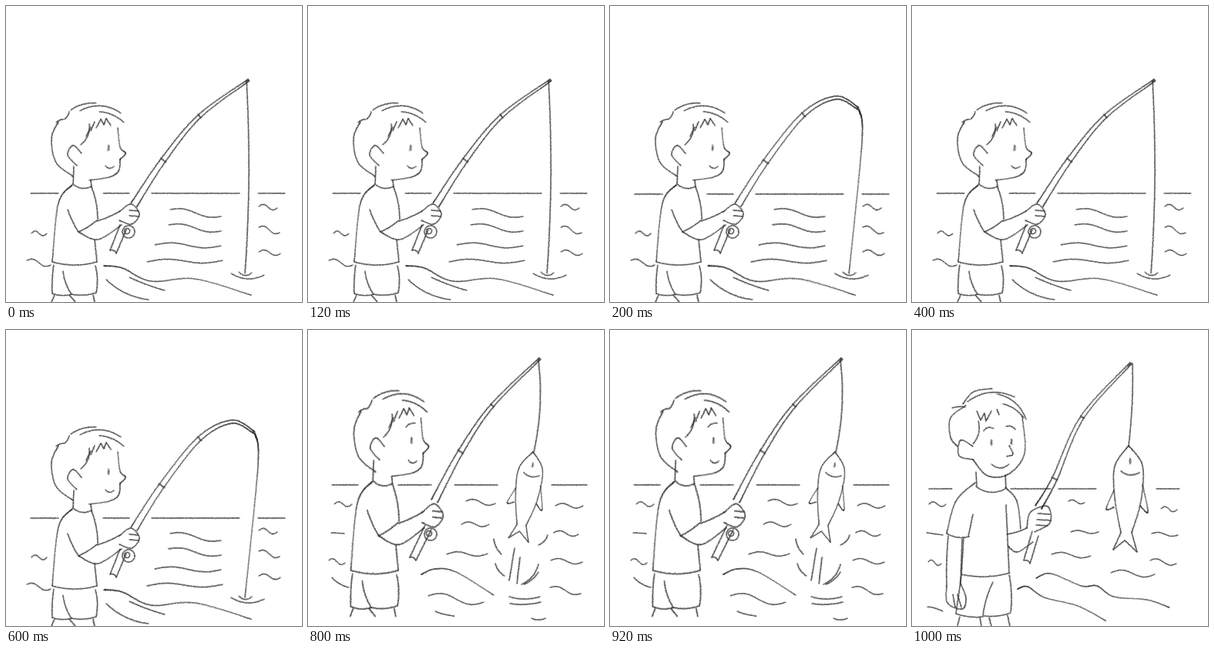
Write an HTML page with a canvas that moves like this. It is 384x384 px and loops after 1200 ms.

```html
<!DOCTYPE html>
<html lang="en">
<head>
<meta charset="utf-8">
<title>Fishing</title>
<style>
html, body { margin: 0; width: 100%; height: 100%; overflow: hidden; background: #fff; }
canvas { display: block; width: 100vw; height: 100vh; }
</style>
</head>
<body>
<canvas id="stage" width="384" height="384"></canvas>
<script>
const SIZE = 384, STEP = 200;
let g, seed, pen = 2.2;

function rnd() {
  seed = (seed * 1664525 + 1013904223) >>> 0;
  return seed / 2 ** 32;
}

// Pencil along a curve: a faint core with grain scattered across its width
function trace(at, length) {
  const n = Math.ceil(length * 2) + 2;
  g.strokeStyle = 'rgba(70,70,70,.34)';
  g.lineWidth = pen * 0.8;
  g.beginPath();
  for (let i = 0; i <= n; i++) g.lineTo(...at(i / n));
  g.stroke();
  for (let i = 0; i <= n * 3; i++) {
    const [x, y] = at(i / n / 3), r = (rnd() + rnd() - 1) * pen * 0.72, a = rnd() * 6.3;
    g.fillStyle = `rgba(55,55,55,${0.1 + rnd() * 0.34})`;
    g.fillRect(x + Math.cos(a) * r - 0.45, y + Math.sin(a) * r - 0.45, 0.9, 0.9);
  }
}

// Arc between two points; b is how far its middle bows sideways
function arc(x1, y1, x2, y2, b = 0) {
  const dx = x2 - x1, dy = y2 - y1, d = Math.hypot(dx, dy);
  trace(t => {
    const k = 4 * b * t * (1 - t) / d;
    return [x1 + dx * t - dy * k, y1 + dy * t + dx * k];
  }, d);
}

const pairs = v => v.flatMap((x, i) => i % 2 ? [] : [[x, v[i + 1]]]);

// Smooth curve through all points
function spline(p) {
  const last = p.length - 1;
  return t => {
    const i = Math.min(last - 1, Math.floor(t * last)), u = t * last - i;
    const b = p[i], c = p[i + 1], a = p[i - 1] || b, d = p[i + 2] || c;
    return [0, 1].map(j => b[j] + u / 2 * (c[j] - a[j] +
      u * (2 * a[j] - 5 * b[j] + 4 * c[j] - d[j] + u * (3 * (b[j] - c[j]) + d[j] - a[j]))));
  };
}

function span(p) {
  return p.slice(1).reduce((s, q, i) => s + Math.hypot(q[0] - p[i][0], q[1] - p[i][1]), 0);
}

function curve(...v) {
  const p = pairs(v);
  trace(spline(p), span(p));
}

function zigzag(...v) {
  const p = pairs(v);
  p.slice(1).forEach((q, i) => arc(...p[i], ...q));
}

function ring(x, y, r) {
  trace(t => [x + r * Math.cos(t * 6.3), y + r * Math.sin(t * 6.3)], r * 6);
}

function wave(x, y, w, drop = 0, amp = 3, turns = 1) {
  trace(t => [x + w * t, y + drop * t - amp * Math.sin(t * turns * 6.28)], w);
}

function bold(w, fn) {
  const old = pen;
  pen = w;
  fn();
  pen = old;
}

const eye = (x, y) => bold(3.6, () => arc(x, y - 3, x, y + 3));
const horizon = (y, ...ends) => pairs(ends).forEach(([a, b]) => arc(a, y, b, y));

// Tapered rod, with joints at its second and third points
function rod(...v) {
  const p = pairs(v), at = spline(p), n = p.length - 1, len = span(p);
  const edge = (t, side) => {
    const [x, y] = at(t), [a, b] = at(Math.max(0, t - 0.01)), [c, d] = at(Math.min(1, t + 0.01));
    const k = side * (4.5 - 3.3 * t) / Math.hypot(c - a, d - b);
    return [x - (d - b) * k, y + (c - a) * k];
  };
  for (const side of [-1, 1]) trace(t => edge(t, side), len);
  bold(3, () => {
    for (const k of [1, 2]) arc(...edge(k / n, -1.2), ...edge(k / n, 1.2));
    arc(...at(0.97), ...at(1));
  });
}

function handle(x1, y1, x2, y2) {
  arc(x1 - 4, y1 - 3, x2 - 4, y2 - 2);
  arc(x1 + 4, y1 + 3, x2 + 4, y2 + 2);
  arc(x2 - 4, y2 - 2, x2 + 4, y2 + 2, -2);
}

function reel(x, y) {
  ring(x, y, 8);
  ring(x - 2, y - 1, 3.5);
}

function placed(x, y, sx, sy, turn, fn) {
  g.save();
  g.translate(x, y);
  g.rotate(turn);
  g.scale(sx, sy);
  fn();
  g.restore();
}

function sideHead() {
  arc(65, 151, 75, 147, -1);
  arc(76, 147, 82, 137, 1);
  arc(84, 135, 117, 126, -3);
  arc(96, 136, 149, 139, -8);
  arc(121, 137, 153, 151, -3);
  arc(97, 180, 108, 153, 4);
  arc(104, 169, 110, 157);
  zigzag(110, 162, 115, 150);
  zigzag(117, 158, 123, 147, 127, 154, 130, 146, 136, 155);
  curve(68, 150, 59, 172, 65, 203, 87, 221);
  curve(98, 191, 87, 181, 80, 193, 92, 207);
  curve(145, 158, 148, 183, 155, 191, 148, 199);
  curve(148, 199, 146, 214, 134, 222, 108, 226);
  arc(129, 207, 140, 208, 3);
  eye(133, 184);
}

function sideBody() {
  arc(88, 208, 87, 231);
  arc(110, 226, 111, 235);
  arc(87, 231, 111, 234, 4);
  curve(86, 232, 68, 256, 60, 332);
  arc(111, 235, 119, 277, -2);
  arc(60, 332, 118, 332, 4);
  arc(115, 303, 118, 332);
  arc(80, 264, 94, 293, 1);
  arc(94, 293, 118, 278, 1);
  arc(118, 279, 148, 266, 1);
  curve(94, 293, 119, 303, 150, 284);
  curve(147, 267, 162, 257, 173, 270, 163, 283, 147, 278);
  arc(160, 265, 172, 266);
  arc(160, 272, 172, 273);
  arc(62, 336, 60, 373, 1);
  arc(60, 373, 85, 374, 2);
  arc(74, 344, 85, 374, 2);
  arc(116, 337, 117, 372, -2);
  arc(85, 374, 117, 372, 2);
  arc(63, 375, 59, 384);
  arc(82, 375, 90, 384);
  arc(113, 375, 115, 384);
}

function calmSea() {
  wave(328, 260, 24, 2);
  wave(328, 287, 27, 7);
  wave(328, 319, 28, 2);
  wave(213, 264, 66, 9);
  wave(211, 284, 68, 8);
  wave(193, 310, 86, 1);
  wave(183, 332, 98, -2);
  wave(33, 295, 20);
  wave(27, 330, 31, 6);
  curve(127, 337, 151, 340, 188, 357, 245, 354, 318, 375);
  arc(130, 355, 185, 381, 5);
  arc(160, 352, 206, 369, 1);
  arc(292, 347, 335, 349, 6);
  arc(302, 345, 319, 346, 4);
}

function waiting(weight, y) {
  sideHead();
  sideBody();
  handle(152, 287, 139, 319);
  reel(159, 293);
  pen = weight;
  calmSea();
  horizon(y, 32, 68, 126, 160, 189, 303, 327, 362);
  pen = 2.1;
}

function slackRod() {
  waiting(1.9, 243);
  rod(166, 258, 204, 200, 251, 143, 315, 96);
  arc(312, 97, 310, 347, -4);
}

function bentRod() {
  waiting(2.3, 244);
  rod(166, 258, 202, 202, 251, 141, 293, 119, 322, 133);
  curve(323, 134, 327, 175, 310, 347);
}

function fish() {
  curve(0, 0, -18, 27, -18, 68, -10, 113);
  curve(0, 0, 18, 26, 16, 72, 4, 113);
  bold(3, () => arc(-10, 33, 14, 35, 4));
  eye(2, 20);
  zigzag(-10, 113, -20, 135, -5, 123, 11, 138, 4, 113);
  curve(-19, 58, -29, 82, -19, 80);
  curve(18, 50, 25, 86, 15, 78);
}

function splash() {
  arc(241, 271, 251, 291, 2);
  arc(268, 283, 261, 325);
  arc(275, 295, 271, 329);
  arc(299, 304, 277, 330, -4);
  arc(299, 314, 280, 330, -2);
  arc(311, 266, 299, 279, -2);
  arc(243, 303, 255, 319, 2);
  arc(261, 346, 301, 346, 3);
  arc(262, 355, 302, 353, 2);
  arc(290, 374, 308, 374, 2);
}

function pullOut() {
  pen = 2.3;
  placed(0, -61, 1.01, 1.11, 0, sideHead);
  placed(-8, -70, 1.06, 1.15, 0, sideBody);
  arc(127, 126, 139, 121, -2);
  rod(164, 222, 198, 158, 239, 98, 301, 37);
  handle(156, 256, 136, 297);
  reel(159, 265);
  arc(299, 40, 293, 158, -5);
  placed(292, 158, 0.85, 0.85, 0.13, fish);
  splash();
  horizon(201, 31, 65, 117, 160, 190, 246, 316, 362);
  pen = 2;
  wave(34, 226, 23);
  arc(30, 263, 47, 264);
  wave(27, 299, 21, 3);
  arc(31, 321, 53, 334, 2);
  wave(205, 222, 38, 3);
  wave(199, 252, 36);
  wave(180, 291, 53, -1);
  wave(321, 228, 36);
  wave(319, 263, 32, 2);
  wave(315, 299, 41, 2);
  wave(314, 334, 40, 8);
  curve(147, 317, 165, 310, 192, 314, 241, 344);
  wave(156, 345, 72, 8, 5);
  arc(165, 365, 190, 371, 1);
}

function frontHead() {
  curve(70, 98, 50, 114, 50, 139, 59, 151);
  arc(52, 101, 69, 100, -1);
  curve(66, 96, 80, 80, 104, 76);
  arc(72, 93, 133, 87, -9);
  arc(110, 83, 148, 116, -7);
  arc(118, 96, 145, 114, -3);
  arc(79, 148, 86, 118, 4);
  zigzag(84, 105, 89, 117, 94, 108, 96, 118, 103, 105);
  arc(110, 103, 113, 110);
  curve(79, 151, 63, 143, 61, 163, 79, 168);
  curve(143, 112, 146, 160, 125, 187, 98, 189, 79, 168);
  arc(93, 131, 106, 128, -3);
  arc(122, 125, 134, 129, -2);
  curve(126, 150, 131, 161, 123, 164);
  arc(103, 174, 126, 174, 5);
  eye(103, 146);
  eye(129, 145);
}

function frontBody() {
  arc(83, 184, 84, 203);
  arc(121, 188, 122, 205);
  arc(83, 203, 121, 206, 6);
  curve(82, 198, 57, 222, 45, 264);
  arc(45, 264, 74, 268, 3);
  arc(79, 239, 73, 268);
  arc(67, 270, 64, 317);
  arc(64, 317, 127, 315, 4);
  curve(121, 204, 136, 222, 141, 258);
  arc(122, 227, 126, 315);
  arc(123, 265, 149, 257, 1);
  curve(125, 281, 137, 288, 157, 275);
  arc(47, 267, 45, 332, 1);
  arc(65, 271, 63, 329);
  curve(45, 332, 46, 354, 65, 362, 70, 348, 63, 329);
  arc(53, 343, 56, 360);
  arc(59, 343, 64, 360);
  curve(149, 257, 154, 236, 176, 229, 179, 250, 159, 262);
  arc(163, 238, 179, 239);
  arc(162, 246, 180, 247);
  arc(161, 253, 176, 254);
  arc(64, 319, 57, 368);
  arc(57, 368, 92, 372, 2);
  arc(105, 327, 92, 371, 2);
  arc(126, 318, 128, 366, -2);
  arc(93, 371, 128, 367, 2);
  arc(62, 372, 59, 384);
  arc(88, 373, 90, 384);
  arc(100, 373, 103, 384);
  arc(124, 370, 127, 384);
}

function showCatch() {
  frontHead();
  frontBody();
  rod(164, 230, 185, 193, 221, 113, 284, 43);
  handle(160, 264, 149, 301);
  arc(286, 43, 281, 150, -2);
  placed(281, 150, 1, 1, 0, fish);
  pen = 1.9;
  horizon(206, 22, 52, 128, 180, 190, 239, 317, 347);
  wave(22, 226, 22);
  arc(19, 263, 40, 266);
  wave(21, 301, 17, 2);
  arc(20, 359, 40, 365, -1);
  wave(203, 222, 21, 2, 2);
  wave(206, 262, 36, 0, 2);
  wave(181, 291, 51, 2);
  wave(323, 232, 21, 1);
  wave(311, 264, 34, 2, 2);
  wave(309, 299, 34, 4);
  wave(258, 315, 57, 2, 4);
  curve(161, 322, 180, 316, 220, 332, 240, 332, 262, 346, 305, 350, 334, 360);
  curve(137, 336, 150, 333, 172, 347, 215, 358, 251, 377);
}

function render(pose, i) {
  const c = document.createElement('canvas');
  c.width = c.height = SIZE;
  g = c.getContext('2d');
  g.fillStyle = '#fff';
  g.fillRect(0, 0, SIZE, SIZE);
  g.lineCap = g.lineJoin = 'round';
  seed = 71 + i * 997;
  pen = 2.1;
  pose();
  return c;
}

const [slack, bent, pull, show] = [slackRod, bentRod, pullOut, showCatch].map(render);
const cycle = [slack, bent, slack, bent, pull, show];
const stage = document.getElementById('stage').getContext('2d');
const start = performance.now();

function tick() {
  const t = performance.now() - start;
  stage.drawImage(cycle[Math.floor(t / STEP) % cycle.length], 0, 0);
  requestAnimationFrame(tick);
}
tick();
</script>
</body>
</html>
```
